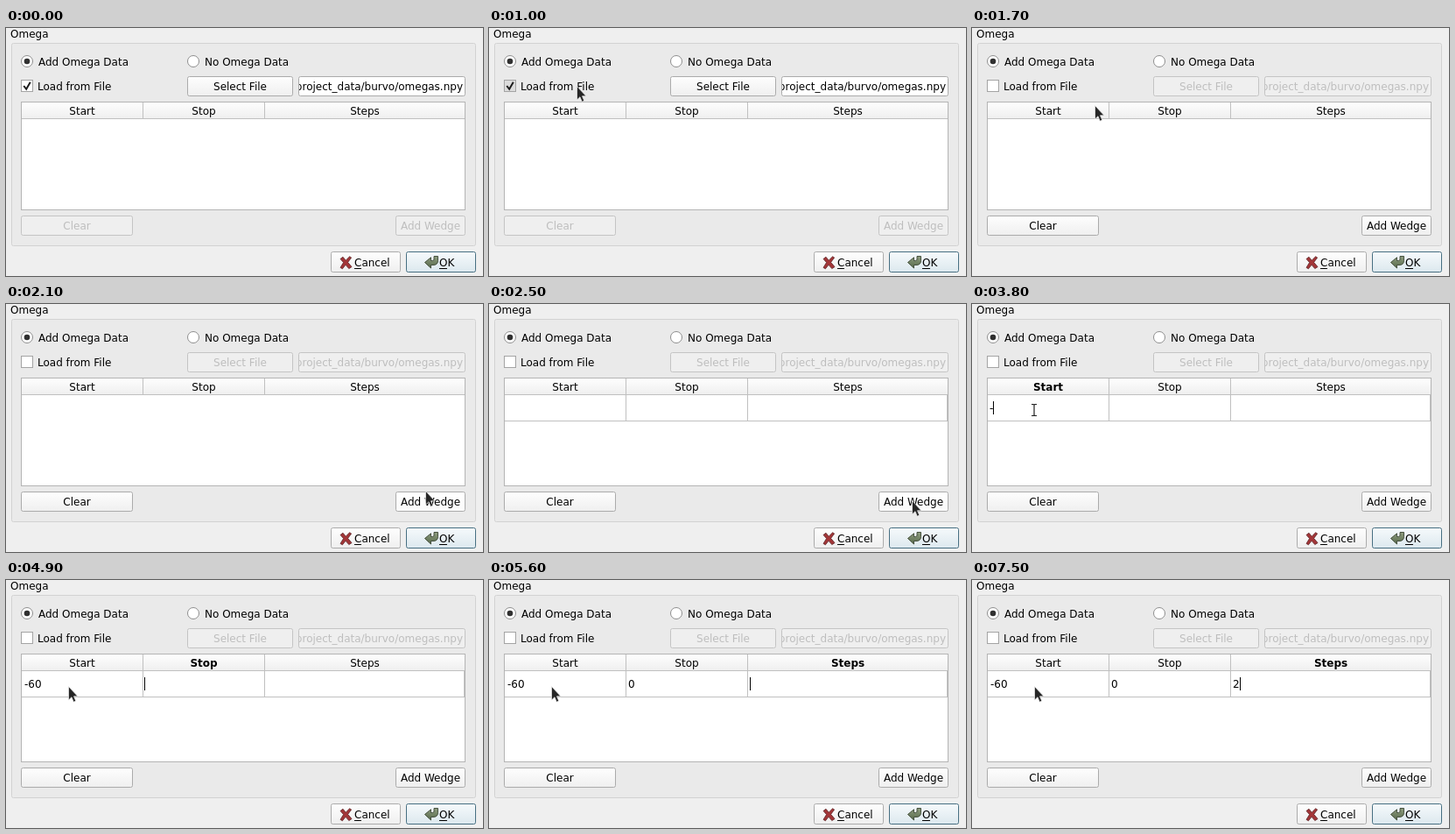
Recreate the animation shown at these times as an HTML page. Size 545 by 283 pixels, loop 8 s.

```html
<!DOCTYPE html>
<html lang="en">
<head>
<meta charset="utf-8">
<title>Omega dialog</title>
<style>
  html, body { margin: 0; width: 100%; height: 100%; overflow: hidden; background: #efefef; }
  svg { display: block; width: 100%; height: 100%; }
  text { font: 12px "DejaVu Sans", sans-serif; fill: #000; white-space: pre; }
  .mid { text-anchor: middle; }
  .end { text-anchor: end; }
  .bold { font-weight: bold; }
  .button rect { fill: url(#face); stroke: #ababab; }
  .button.hover rect { fill: url(#lit); }
  .button.down rect { fill: #dcdcdc; }
  .field rect { fill: #fff; stroke: #ababab; }
  .off rect { fill: #efefef; stroke: #c4c4c4; }
  .off text { fill: #bebebe; }
  .default rect { fill: url(#blue); stroke: #476f82; }
  .line { fill: none; stroke: #c0c0c0; }
</style>
</head>
<body>
<svg id="stage" viewBox="0 0 545 283" xmlns="http://www.w3.org/2000/svg">
  <defs>
    <linearGradient id="face" x2="0" y2="1">
      <stop stop-color="#fefefe"/><stop offset="1" stop-color="#efefef"/>
    </linearGradient>
    <linearGradient id="lit" x2="0" y2="1">
      <stop stop-color="#fff"/><stop offset="1" stop-color="#fafafa"/>
    </linearGradient>
    <linearGradient id="blue" x2="0" y2="1">
      <stop stop-color="#f6fafc"/><stop offset="1" stop-color="#dce8ee"/>
    </linearGradient>
    <linearGradient id="leaf" x2="0" y2="1">
      <stop stop-color="#8f9d80"/><stop offset="1" stop-color="#56694a"/>
    </linearGradient>
    <clipPath id="fieldClip"><rect x="335" y="56" width="189" height="22"/></clipPath>
  </defs>
</svg>
<script>
const NS = 'http://www.w3.org/2000/svg';
const stage = document.getElementById('stage');
const LOOP = 8000;

function add(tag, attrs, parent = stage, content = '') {
  const node = document.createElementNS(NS, tag);
  for (const key in attrs) node.setAttribute(key, attrs[key]);
  node.textContent = content;
  parent.appendChild(node);
  return node;
}
const label = (content, x, y, cls = '', parent = stage) =>
  add('text', { x, y, class: cls }, parent, content);
const box = (x, y, width, height, attrs = {}, parent = stage) =>
  add('rect', { x: x + 0.5, y: y + 0.5, width, height, ...attrs }, parent);
const path = (d, attrs, parent = stage) => add('path', { d, ...attrs }, parent);
const show = (node, on) => node.setAttribute('visibility', on ? 'visible' : 'hidden');

function button(content, x, y, w, h, base, cls = '') {
  const g = add('g', { class: 'button ' + cls });
  box(x, y, w, h, { rx: 2 }, g);
  if (content) label(content, x + 0.5 + w / 2, base, 'mid', g);
  return g;
}
function radio(content, cx, x, on) {
  add('circle', { cx, cy: 38, r: 6.5, fill: '#fff', stroke: '#8e8e8e' });
  if (on) add('circle', { cx, cy: 38, r: 3.3, fill: '#303030' });
  label(content, x, 43);
}

// Group box and options
label('Omega', 5, 11);
box(6, 17, 530, 231, { rx: 2, fill: '#eaeaea', stroke: '#d2d2d2' });
radio('Add Omega Data', 24, 37, true);
radio('No Omega Data', 214, 227, false);
const check = box(17, 59, 13, 13, { stroke: '#a4a4a4' });
const tick = path('M20.3 66 L23.2 69.8 L27.8 61.8', { fill: 'none', stroke: '#1c1c1c', 'stroke-width': 2 });
label('Load from File', 36, 71);
const select = button('Select File', 207, 55, 120, 22, 71);
const field = add('g', { class: 'field' });
box(334, 55, 190, 22, { rx: 2 }, field);
const fileClip = add('g', { 'clip-path': 'url(#fieldClip)' }, field);
label('project_data/burvo/omegas.npy', 522, 71, 'end', fileClip);

// Table
box(17, 84, 507, 123, { fill: '#fff', stroke: '#b4b4b4' });
add('rect', { x: 18, y: 85, width: 506, height: 18, fill: 'url(#face)' });
path('M18 103.5H524M156.5 85V103M295.5 85V103', { class: 'line' });
const heads = [['Start', 87], ['Stop', 226], ['Steps', 410]].map(([s, x]) => label(s, x, 99, 'mid'));
const grid = path('M18 133.5H524M156.5 104V133M295.5 104V133M523.5 104V133', { class: 'line' });
const cellX = [20, 158, 298];
const cells = cellX.map(x => label('', x, 123));
const caret = add('rect', { y: 111, width: 1, height: 15, fill: '#000' });

// Lower buttons
const clear = button('Clear', 17, 214, 127, 22, 230);
const wedge = button('Add Wedge', 445, 214, 79, 22, 230);
button('', 371, 255, 79, 23, 272);
button('', 457, 255, 79, 23, 272, 'default');
label('Cancel', 398, 272);
label('OK', 495, 272);
path('M398 274.5H406M495 274.5H504', { stroke: '#000' });
path('M382 263.5L385 261.3L388.2 265.2L392.6 260.8L394.6 262L390.6 267.4L395 272.6L391.8 274.6L388 270.2L384.4 274.8L382 273.4L385.6 267.6Z',
  { fill: '#a33638', stroke: '#5c2426', 'stroke-width': 0.8 });
path('M489 260.5H493.5V265.5Q493.5 270.5 488 270.5H485.5V274L478.5 267.5L485.5 261.8V265.5H487.5Q489 265.5 489 264Z',
  { fill: 'url(#leaf)', stroke: '#3c4735', 'stroke-width': 0.9 });

// Pointers
const arrow = path('M0.5 0.5V16L4 12.7L6.2 18.2L8.8 17.1L6.5 11.8H11Z',
  { fill: '#262626', stroke: '#f4f4f4', 'stroke-width': 0.7 });
const beam = path('M-3 -6.5H-1Q0 -6.5 0 -5.5V5.5Q0 6.5 -1 6.5H-3M3 -6.5H1Q0 -6.5 0 -5.5M0 5.5Q0 6.5 1 6.5H3',
  { fill: 'none', stroke: '#222', 'stroke-width': 1.2, transform: 'translate(71 121)' });

// Pointer steps: time, x, y
const moves = [
  [400, 149, 8], [500, 97, 82], [800, 99, 66], [1000, 100, 66],
  [1700, 140, 88], [1800, 275, 157], [1900, 425, 217], [2000, 501, 229], [2100, 479, 213],
  [2300, 482, 221], [2400, 483, 224],
  [2800, 501, 204], [2900, 335, 150], [3000, 135, 119], [3100, 71, 121]
];
// Typing steps: time, column, text
const edits = [
  [2600, 0, ''], [3800, 0, '-'], [4400, 0, '-6'], [4600, 0, '-60'],
  [4900, 1, ''], [5300, 1, '0'], [5600, 2, ''], [7500, 2, '2']
];
const blinks = [[3100, 3600], [6300, 6800], [7300, 7500]];

const within = (t, from, to) => t >= from && t < to;
const latest = (steps, t) => steps.filter(s => s[0] <= t).pop();
const advance = s => [...s].reduce((w, c) => w + (c === '-' ? 4 : 8), 0);

function drawPointer(t) {
  const move = latest(moves, t);
  const typing = within(t, 3100, 4900);
  show(arrow, move && !typing);
  show(beam, typing);
  if (!move) return;
  const [, x, y] = move;
  arrow.setAttribute('transform', `translate(${x} ${y})`);
  const over = x >= 445 && x < 525 && y >= 214 && y < 237 || within(t, 2100, 2300);
  wedge.classList.toggle('hover', over);
}

function drawTable(t) {
  const edit = latest(edits, t);
  const col = edit ? edit[1] : -1;
  show(grid, t >= 2500);
  heads.forEach((h, i) => h.classList.toggle('bold', i === col));
  cells.forEach((cell, i) => {
    const entry = latest(edits.filter(e => e[1] === i), t);
    cell.textContent = entry ? entry[2] : '';
    cell.setAttribute('x', cellX[i] + (i === col ? 0 : 1));
  });
  show(caret, edit && !blinks.some(([a, b]) => within(t, a, b)));
  if (edit) caret.setAttribute('x', cellX[col] + advance(edit[2]));
}

function draw(t) {
  const manual = t >= 1200;
  show(tick, !manual);
  check.setAttribute('fill', within(t, 1000, 1200) ? '#dcdcdc' : '#fff');
  for (const part of [select, field]) part.classList.toggle('off', manual);
  for (const part of [clear, wedge]) part.classList.toggle('off', !manual);
  wedge.classList.remove('hover');
  wedge.classList.toggle('down', within(t, 2400, 2500));
  drawPointer(t);
  drawTable(t);
}

function tick60() {
  draw(performance.now() % LOOP);
  requestAnimationFrame(tick60);
}
tick60();
</script>
</body>
</html>
```
